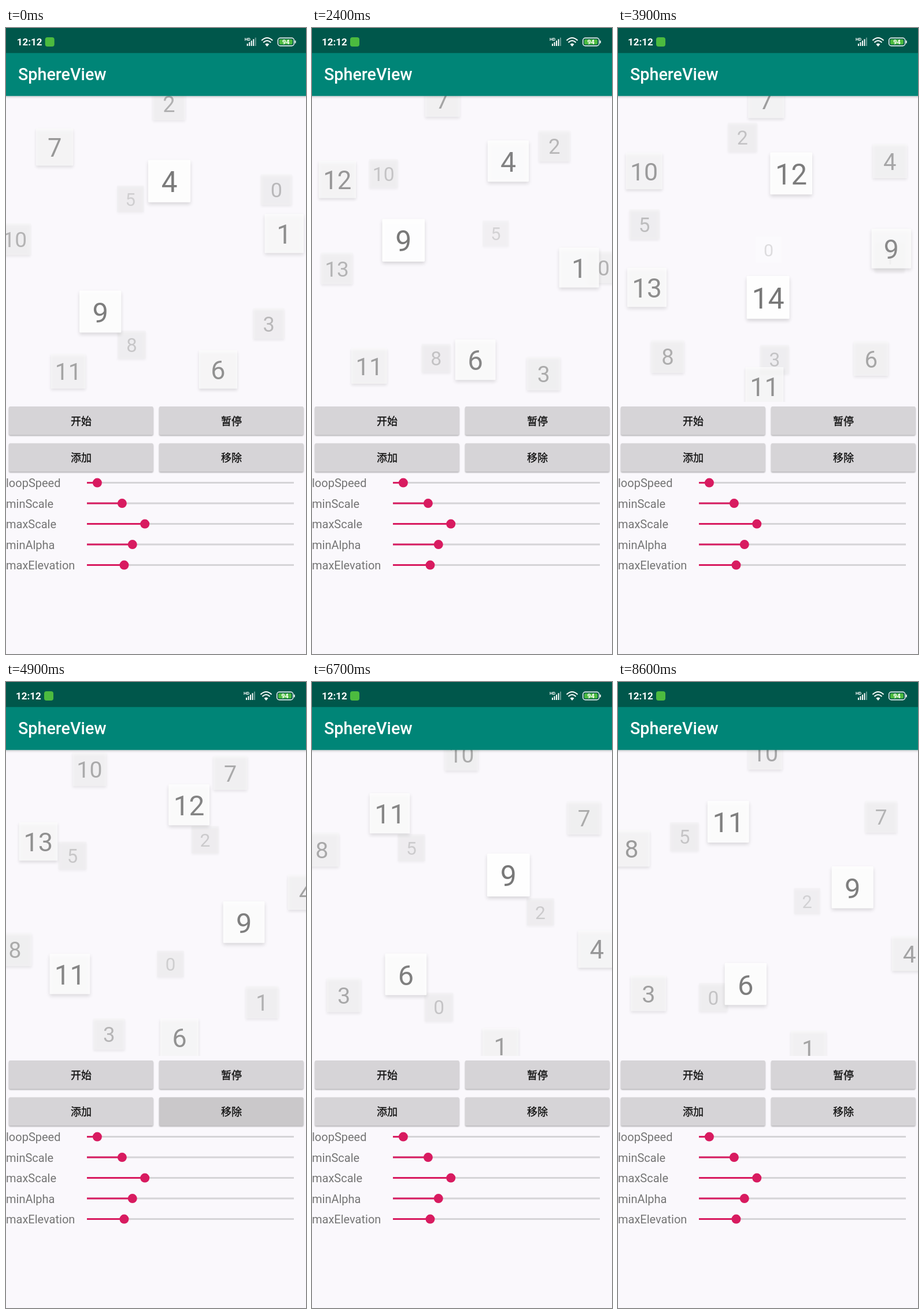
Recreate the animation shown at these times as an HTML page. Size 519x1080 px, loop 8.7 s.

```html
<!DOCTYPE html>
<html lang="zh">
<head>
<meta charset="utf-8">
<style>
html, body { margin: 0; width: 100%; height: 100%; overflow: hidden; background: #faf8fc; }
svg { display: block; width: 519px; height: 1080px; }
text { font-family: Roboto, "Noto Sans", sans-serif; }
.btn { font: 500 18px "Noto Sans CJK SC", "Noto Sans CJK", "Noto Sans CJK JP", sans-serif; fill: #111; stroke: #111; stroke-width: .35px; text-anchor: middle; }
.num { font-size: 50px; fill: #757575; text-anchor: middle; }
.lbl { font-size: 20px; fill: #757575; }
</style>
</head>
<body>
<svg id="stage" viewBox="0 0 519 1080" xmlns="http://www.w3.org/2000/svg">
  <defs>
    <clipPath id="view"><rect y="117" width="519" height="528"/></clipPath>
    <filter id="soft" x="-30%" y="-30%" width="160%" height="160%"><feGaussianBlur stdDeviation="3.2"/></filter>
    <filter id="edge" x="-5%" y="-15%" width="110%" height="135%"><feGaussianBlur stdDeviation="1.3"/></filter>
    <linearGradient id="drop" x2="0" y2="1"><stop stop-color="#000" stop-opacity=".16"/><stop offset="1" stop-color="#000" stop-opacity="0"/></linearGradient>
  </defs>
  <rect width="519" height="1080" fill="#faf8fc"/>
  <g id="cards" clip-path="url(#view)"></g>
  <rect y="117" width="519" height="5" fill="url(#drop)"/>
  <rect y="43" width="519" height="74.3" fill="#008577"/>
  <rect width="519" height="43.200" fill="#00574b"/>
  <text x="21" y="90" font-size="28.7" font-weight="500" fill="#fff">SphereView</text>
  <g id="status" fill="#fff">
    <text x="17" y="30" font-size="17" font-weight="600">12:12</text>
    <rect x="66" y="16" width="16" height="16" rx="4" fill="#4cbb3f"/>
    <text x="411" y="21.500" font-size="7.500" font-weight="600">HD</text>
    <g id="bars"></g>
    <g fill="none" stroke="#fff" stroke-width="2">
      <path d="M440.500 21.500Q450 12.500 459.500 21.500M443.500 25Q450 18.500 456.500 25"/>
      <path d="M446.500 28Q450 25 453.500 28L450 32Z" fill="#fff" stroke="none"/>
      <rect x="468.700" y="17.200" width="28" height="13.600" rx="4" stroke-width="1.400"/>
    </g>
    <rect x="471" y="19.500" width="23" height="9" rx="2" fill="#4cbb3f"/>
    <rect x="498" y="21.500" width="1.700" height="5" rx=".8"/>
    <text x="482.500" y="28" font-size="11" font-weight="700" text-anchor="middle">94</text>
  </g>
  <g id="panel"></g>
  <circle id="touch" cx="189" cy="754" r="14" fill="#d5dcdc" fill-opacity=".65" stroke="#a9adad" stroke-width="1"/>
</svg>
<script>
const LOOP = 8700, STEP = 100, CX = 259.5, CY = 381, R = 260;
const GOLDEN = Math.PI * (3 - Math.sqrt(5)), MORPH = 500, FIRST = 12;
const $ = id => document.getElementById(id);

function make(parent, tag, attrs, text) {
  const el = document.createElementNS("http://www.w3.org/2000/svg", tag);
  for (const k in attrs) el.setAttribute(k, attrs[k]);
  if (text !== undefined) el.textContent = text;
  parent.appendChild(el);
  return el;
}

// Each tap adds or removes one card
const adds = [1245, 1945, 3100], removes = [4600, 5150, 5690];

// The sphere's turning is steered by three cards: one in front, two behind
const guides = [{ id: 9, side: 1 }, { id: 5, side: -1 }, { id: 0, side: -1 }];
const poses = [
  { t: 0, at: [[164, 490], [216, 295], [468, 279]] },
  { t: 1300, at: [[195, 454], [188, 326], [451, 306]] },
  { t: 2400, at: [[159, 367], [317, 355], [505, 413]] },
  { t: 3900, at: [[473, 381], [46, 339], [260, 382]] },
  { t: 5900, at: [[327, 350], [198, 306], [243, 568]] },
  { t: 7500, at: [[364, 342], [151, 278], [200, 556]] },
  { t: 8600, at: [[406, 355], [115, 267], [165, 544]] }
];

const clamp = v => Math.max(0, Math.min(1, v));
const mix = (a, b, k) => a.map((v, i) => v + (b[i] - v) * k);
const dot = (a, b) => a.reduce((s, v, i) => s + v * b[i], 0);
const cross = (a, b) => [a[1] * b[2] - a[2] * b[1], a[2] * b[0] - a[0] * b[2], a[0] * b[1] - a[1] * b[0]];
const unit = a => { const n = Math.hypot(...a); return a.map(v => v / n); };

// Golden-angle spiral over the unit sphere; a new card starts in its centre
function spiral(i, n) {
  if (i >= n) return [0, 0, 0];
  const c = -1 + (2 * i + 1) / n, s = Math.sqrt(1 - c * c);
  return [s * Math.cos(i * GOLDEN), -s * Math.sin(i * GOLDEN), c];
}

function layout(t) {
  let from = FIRST, to = FIRST, k = 1;
  [...adds, ...removes].forEach((at, i) => {
    if (t < at) return;
    from = to;
    to += i < adds.length ? 1 : -1;
    k = clamp((t - at) / MORPH);
  });
  return { count: to, place: i => mix(spiral(i, from), spiral(i, to), k) };
}

// Quaternions are [x, y, z, w]
function rotate(q, v) {
  const a = cross(q, v), b = cross(q, a);
  return v.map((x, i) => x + 2 * (q[3] * a[i] + b[i]));
}

function turn(q, w) {
  const c = cross(w, q), d = w[0] * q[0] + w[1] * q[1] + w[2] * q[2];
  return unit([0, 1, 2].map(i => q[i] + (w[i] * q[3] + c[i]) / 2).concat(q[3] - d / 2));
}

// Turn step by step until the guide cards lie where the pose puts them
function orient({ t, at }, q) {
  const { place } = layout(t);
  const pairs = guides.map(({ id, side }, i) => {
    const x = (at[i][0] - CX) / R, y = (at[i][1] - CY) / R;
    return [unit(place(id)), [x, y, side * Math.sqrt(Math.max(0, 1 - x * x - y * y))]];
  });
  for (let n = 0; n < 800; n++) {
    const w = [0, 0, 0];
    for (const [body, seen] of pairs)
      cross(rotate(q, body), seen).forEach((v, i) => { w[i] += v / pairs.length; });
    q = turn(q, w);
  }
  return q;
}

let last = unit([0.1, 0.2, 0.3, 1]);
for (const p of poses) p.q = last = orient(p, last);

function slerp(a, b, k) {
  let d = dot(a, b);
  if (d < 0) { b = b.map(v => -v); d = -d; }
  if (d > 0.9999) return unit(mix(a, b, k));
  const th = Math.acos(d);
  return a.map((v, i) => (v * Math.sin((1 - k) * th) + b[i] * Math.sin(k * th)) / Math.sin(th));
}

function orientation(t) {
  let i = 0;
  while (i < poses.length - 2 && t >= poses[i + 1].t) i++;
  const a = poses[i], b = poses[i + 1];
  return slerp(a.q, b.q, clamp((t - a.t) / (b.t - a.t)));
}

for (let i = 0; i < 5; i++) {
  const h = 4 + 2.6 * i;
  make($("bars"), "rect", { x: 415 + 3.5 * i, y: 31 - h, width: 2, height: h, opacity: i < 4 ? 1 : .4 });
}

const panel = $("panel");
const shades = ["开始", "暂停", "添加", "移除"].map((name, i) => {
  const box = { x: i % 2 ? 265 : 5, y: i < 2 ? 653 : 716.5, width: 249.5, height: 49, rx: 2 };
  make(panel, "rect", { ...box, y: box.y + 1.5, opacity: .3, filter: "url(#edge)" });
  make(panel, "rect", { ...box, fill: "#d6d4d7" });
  const shade = make(panel, "rect", { ...box, fill: "#b8b7b9", opacity: 0 });
  make(panel, "text", { x: box.x + 125, y: box.y + 31.5, class: "btn" }, name);
  return shade;
});

const sliders = { loopSpeed: .05, minScale: .17, maxScale: .28, minAlpha: .22, maxElevation: .18 };
Object.entries(sliders).forEach(([name, value], i) => {
  const y = 784.6 + 35.5 * i, x = 140 + 358 * value;
  make(panel, "text", { x: 0, y: y + 7.5, class: "lbl" }, name);
  make(panel, "path", { d: `M140 ${y}H498`, stroke: "#d5d4d7", "stroke-width": 3 });
  make(panel, "path", { d: `M140 ${y}H${x}`, stroke: "#d81b60", "stroke-width": 3 });
  make(panel, "circle", { cx: x, cy: y, r: 8, fill: "#d81b60" });
});

const cards = Array.from({ length: FIRST + adds.length }, (_, i) => {
  const g = make($("cards"), "g", {});
  const box = { x: -37, y: -37, width: 74, height: 74, rx: 1.5 };
  return {
    g,
    glow: make(g, "rect", { ...box, y: -33.5, filter: "url(#soft)" }),
    under: make(g, "rect", box),
    face: make(g, "rect", { ...box, fill: "#fff" }),
    num: make(g, "text", { y: 19, class: "num" }, i)
  };
});

// A pressed button stays dark briefly, then fades
const press = (times, t) => Math.max(...times.map(at => t < at - 100 ? 0 : clamp((450 - t + at) / 350)));

function draw(t) {
  const { count, place } = layout(t), q = orientation(t);
  const shown = [];
  cards.forEach((c, i) => {
    c.g.style.display = i < count ? "" : "none";
    if (i >= count) return;
    const [x, y, z] = rotate(q, place(i));
    const alpha = .22 + .39 * (z + 1), lift = clamp((z + 1) * 25);
    c.g.setAttribute("transform", `translate(${CX + R * x} ${CY + R * y}) scale(${(60 + 15 * z) / 74})`);
    c.glow.setAttribute("opacity", .14 * alpha * lift);
    c.under.setAttribute("opacity", .035 * lift);
    c.face.setAttribute("opacity", alpha);
    c.num.setAttribute("opacity", alpha);
    shown.push([z, c.g]);
  });
  shown.sort((a, b) => a[0] - b[0]).forEach(s => $("cards").appendChild(s[1]));

  shades[2].setAttribute("opacity", press(adds, t));
  shades[3].setAttribute("opacity", press(removes, t));
  $("touch").setAttribute("opacity", adds.some(at => Math.abs(t - at) < 100) ? 1 : 0);
  $("status").setAttribute("transform", `translate(${t < 500 ? 1.7 : 0} 0)`);
}

const start = performance.now();
function tick() {
  const t = (performance.now() - start) % LOOP;
  draw(Math.floor(t / STEP) * STEP);
  requestAnimationFrame(tick);
}
tick();
</script>
</body>
</html>
```
